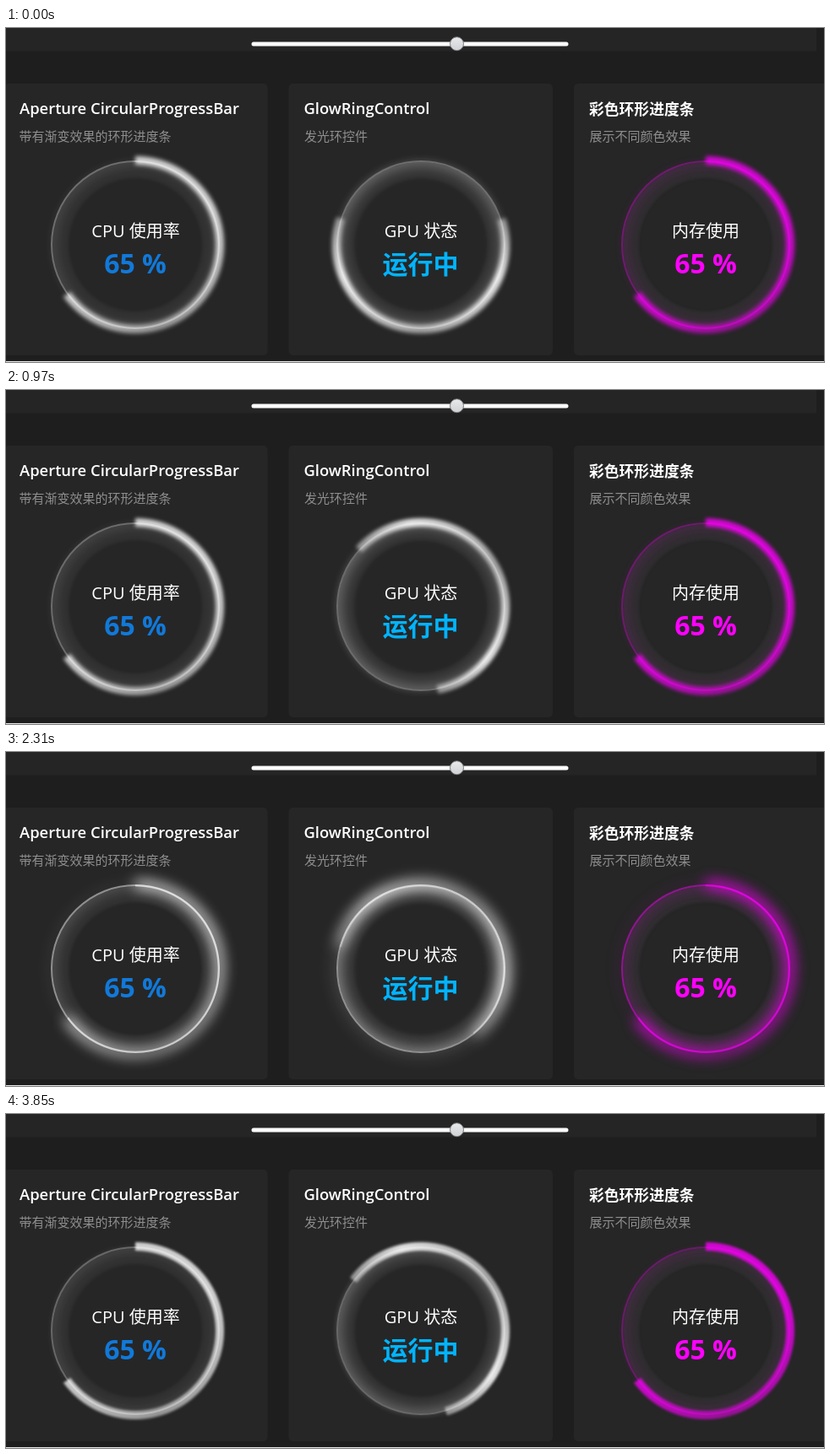
Animation of 968 by 396 pixels, one loop 3.92 s. Source, as an HTML page:

```html
<!DOCTYPE html>
<html lang="zh-CN">
<head>
<meta charset="utf-8">
<title>Glow rings</title>
<style>
@property --g { syntax: "<number>"; inherits: true; initial-value: 0; }

html, body {
  margin: 0;
  width: 100%;
  height: 100%;
  overflow: hidden;
  background: #1e1e1e;
}

.stage {
  position: relative;
  width: 968px;
  height: 396px;
  overflow: hidden;
  animation: pulse 3920ms infinite;
}

svg { position: absolute; inset: 0; }

text { font-family: "Open Sans", "Noto Sans CJK SC", "Noto Sans CJK", sans-serif; }
.title { font-size: 18.4px; font-weight: 600; fill: #fff; }
.zh { font-size: 17.8px; font-weight: 700; }
.sub { font-size: 15px; fill: #8e8e8e; }
.label { font-size: 20px; fill: #fff; text-anchor: middle; }
.value { font-size: 32px; font-weight: 700; text-anchor: middle; }
.state { font-size: 30px; }

/* --g runs from 0 (tight arc) to 1 (widest glow) */
@keyframes pulse {
  0% { --g: .2; animation-timing-function: ease-out; }
  13.5% { --g: 0; animation-timing-function: cubic-bezier(.37, 0, .63, 1); }
  59.4% { --g: 1; animation-timing-function: cubic-bezier(.37, 0, .63, 1); }
  100% { --g: .04; }
}

@keyframes spin {
  from { transform: rotate(180deg); }
  to { transform: rotate(1152deg); }
}

.ring {
  --c: 255 255 255;
  --base: .2;
  --sweep: rgb(var(--c) / .84) 0deg, rgb(var(--c) / .84) 65deg,
    rgb(var(--c) / .55) 165deg, rgb(var(--c) / .8) 234deg, transparent 234deg;
  position: absolute;
  left: calc(var(--x) * 1px - 150px);
  top: 106.5px;
  width: 300px;
  height: 300px;
}
.ring * { position: absolute; inset: 0; }

.band {
  background: radial-gradient(circle closest-side, transparent 51%,
    rgb(255 255 255 / .035) 54%, rgb(255 255 255 / .045) 64%, transparent 67%);
}

.track {
  inset: 50px !important;
  box-sizing: border-box;
  border: 2.5px solid rgb(var(--c) / calc(.28 + .2 * var(--g)));
  border-radius: 50%;
  box-shadow:
    inset 0 0 22px rgb(var(--c) / calc(var(--base) * (.8 + .4 * var(--g)))),
    0 0 calc(6px + 18px * var(--g)) rgb(var(--c) / calc(var(--base) * .4));
}

.glow {
  filter: blur(calc(1.4px + 6.6px * var(--g)));
  opacity: calc(.92 + .08 * var(--g));
}

.arc, .line {
  background: conic-gradient(var(--sweep));
  -webkit-mask: radial-gradient(circle, transparent var(--in), #000 calc(var(--in) + 1px),
    #000 var(--out), transparent calc(var(--out) + 1px));
  mask: radial-gradient(circle, transparent var(--in), #000 calc(var(--in) + 1px),
    #000 var(--out), transparent calc(var(--out) + 1px));
}
.arc { --in: 94.5px; --out: 104.5px; }
.line { --in: 97px; --out: 99.3px; opacity: calc(.08 + .52 * var(--g)); }

.spinner {
  --base: .48;
  --sweep: rgb(var(--c) / .5) 0deg, rgb(var(--c) / .92) 40deg, rgb(var(--c) / .58) 108deg,
    rgb(var(--c) / .92) 176deg, rgb(var(--c) / .5) 216deg, transparent 216deg;
}
.spinner .arc, .spinner .line { background: conic-gradient(from -108deg, var(--sweep)); }
.spinner .turn { animation: spin 3920ms linear infinite; }

.magenta { --c: 255 0 255; --base: .2; }
</style>
</head>
<body>
<div class="stage">
  <svg width="968" height="396">
    <defs>
      <linearGradient id="knob" x2="0" y2="1">
        <stop stop-color="#e9e9eb"/>
        <stop offset="1" stop-color="#cfd1d4"/>
      </linearGradient>
    </defs>
    <path d="M0 0H959V27.5H0z" fill="#252525"/>
    <rect x="290.5" y="16.5" width="375" height="5" rx="2.5" fill="#fafafa"/>
    <circle cx="533.5" cy="18.7" r="8" fill="url(#knob)" stroke="#77797c"/>
    <g fill="#262626">
      <rect x="-3" y="66" width="312.5" height="322" rx="5"/>
      <rect x="334.5" y="66" width="312.5" height="322" rx="5"/>
      <rect x="672" y="66" width="312.5" height="322" rx="5"/>
    </g>
    <path d="M0 395H968V396H0z" fill="#e6e6e6"/>
  </svg>

  <div class="ring" style="--x:153">
    <div class="band"></div><div class="track"></div>
    <div class="turn"><div class="glow"><div class="arc"></div></div><div class="line"></div></div>
  </div>
  <div class="ring spinner" style="--x:490.5">
    <div class="band"></div><div class="track"></div>
    <div class="turn"><div class="glow"><div class="arc"></div></div><div class="line"></div></div>
  </div>
  <div class="ring magenta" style="--x:828">
    <div class="band"></div><div class="track"></div>
    <div class="turn"><div class="glow"><div class="arc"></div></div><div class="line"></div></div>
  </div>

  <svg width="968" height="396">
    <text class="title" x="16" y="102">Aperture CircularProgressBar</text>
    <text class="sub" x="15.5" y="133.7">带有渐变效果的环形进度条</text>
    <text class="label" x="153.5" y="248">CPU 使用率</text>
    <text class="value" x="153" y="290.5" fill="#1179d9">65 %</text>

    <text class="title" x="352.5" y="102">GlowRingControl</text>
    <text class="sub" x="353" y="133.7">发光环控件</text>
    <text class="label" x="491" y="248">GPU 状态</text>
    <text class="value state" x="490.5" y="291" fill="#00b4ff">运行中</text>

    <text class="title zh" x="690" y="102.5">彩色环形进度条</text>
    <text class="sub" x="690.5" y="133.7">展示不同颜色效果</text>
    <text class="label" x="828" y="248">内存使用</text>
    <text class="value" x="828" y="290.5" fill="#ff00ff">65 %</text>
  </svg>
</div>
</body>
</html>
```
